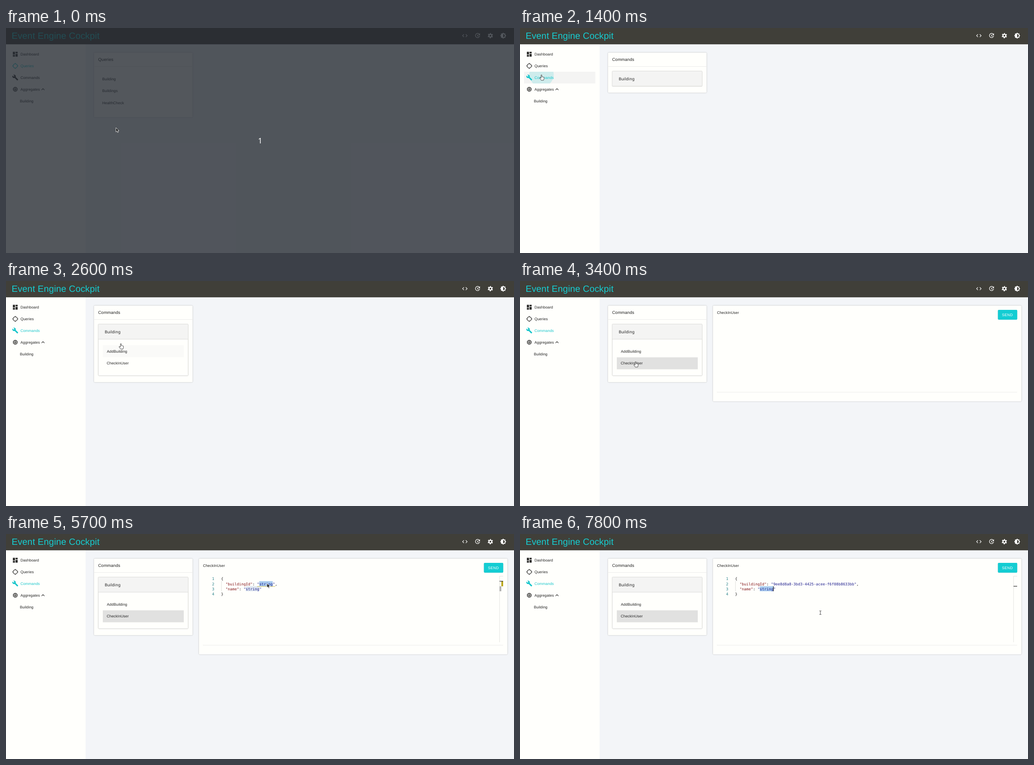
An HTML page for the animation above (8 s loop, 1123 by 499 pixels).

```html
<!DOCTYPE html>
<html lang="en">
<head>
<meta charset="utf-8">
<title>Event Engine Cockpit</title>
<style>
  html, body { margin: 0; width: 100%; height: 100%; overflow: hidden; background: #f3f5f8; }
  svg.stage { display: block; width: 100vw; height: 100vh; }
  text {
    font: 8.25px "Liberation Sans", Arial, sans-serif; letter-spacing: .0107em;
    fill: #222; text-rendering: geometricPrecision; white-space: pre;
  }
  .title { font-size: 20.05px; letter-spacing: .00735em; fill: #16cdd1; }
  .head { font-size: 9.43px; letter-spacing: .0094em; }
  .group { font: 8.85px "Noto Sans", sans-serif; letter-spacing: .0094em; }
  .send { fill: #fff; letter-spacing: .0286em; }
  .code text { font: 8.25px "DejaVu Sans Mono", monospace; letter-spacing: 0; fill: #111; }
  .code .num { fill: #237f86; }
  .code .key { fill: #85161a; }
  .code .str { fill: #20208f; }
  .count { font: 17px "Noto Sans", sans-serif; fill: #fff; text-anchor: middle; }
  .card { fill: #fffffc; filter: drop-shadow(0 .5px .8px rgba(0,0,0,.28)); }
  .rule { stroke: #ececea; }
  .item { color: #2b2b29; }
  .item.on { color: #16c5ca; }
  .item.on text { fill: #16c5ca; }
  .icon { fill: currentColor; }
  .line { fill: none; stroke: currentColor; stroke-width: 2; }
</style>
</head>
<body>
<svg class="stage" viewBox="0 0 1123 499" preserveAspectRatio="none">
  <defs>
    <clipPath id="rowClip"><rect x="9" y="97" width="157.500" height="26"/></clipPath>
    <clipPath id="bodyClip"><rect id="bodyBox" x="204" y="95" width="200" height="34"/></clipPath>
  </defs>

  <rect width="1123" height="499" fill="#f3f5f8"/>
  <rect y="36" width="176" height="463" fill="#fffffc"/>
  <rect width="1123" height="36" fill="#403f39" style="filter:drop-shadow(0 .5px 1px rgba(0,0,0,.35))"/>
  <text class="title" x="12.400" y="24">Event Engine Cockpit</text>

  <g color="#fff">
    <path class="icon" transform="translate(1007.300 10) scale(.59)" d="M9.400 16.600L4.800 12l4.600-4.600L8 6l-6 6 6 6zM14.600 16.600L19.200 12l-4.600-4.600L16 6l6 6-6 6z"/>
    <g transform="translate(1035.400 9.900) scale(.59)">
      <path class="line" d="M18.500 6.800A8 8 0 1 0 20 12.100M11.800 8v4.600l3.800 2.300"/>
      <path class="icon" d="M21 3v7.100h-6.800z"/>
    </g>
    <g transform="translate(1063.700 9.900) scale(.59)">
      <circle class="line" cx="12" cy="12" r="5.300" style="stroke-width:3.800"/>
      <circle class="line" cx="12" cy="12" r="8.200" pathLength="12" stroke-dasharray="1 1" stroke-dashoffset=".5" transform="rotate(-90 12 12)" style="stroke-width:3.400"/>
    </g>
    <path class="icon" fill-rule="evenodd" transform="translate(1092 9.900) scale(.59)" d="M20 15.300L23.300 12 20 8.700V4h-4.700L12 .7 8.700 4H4v4.700L.7 12 4 15.300V20h4.700l3.300 3.300 3.300-3.300H20zM12 18V6a6 6 0 0 1 0 12z"/>
  </g>

  <rect id="menuHover" x="9" y="97" width="157.500" height="26" fill="#f4f4f3"/>
  <circle id="ripple" cx="47.500" cy="103.500" fill="#16c5ca" clip-path="url(#rowClip)"/>

  <g class="item">
    <path class="icon" transform="translate(13.400 51) scale(.59)" d="M3 13h8V3H3zM3 21h8v-6H3zM13 21h8V11h-8zM13 3v6h8V3z"/>
    <text x="31.900" y="61">Dashboard</text>
  </g>
  <g class="item" id="queries">
    <g transform="translate(13.400 77) scale(.59)">
      <circle class="line" cx="12" cy="12" r="8"/>
      <path class="line" d="M12 1v3M12 20v3M1 12h3M20 12h3"/>
    </g>
    <text x="31.900" y="87">Queries</text>
  </g>
  <g class="item" id="commands">
    <path class="icon" transform="translate(13.400 102.800) scale(.59)" d="M22.700 19l-9.100-9.100c.9-2.300.4-5-1.500-6.900-2-2-5-2.400-7.400-1.300L9 6 6 9 1.600 4.700C.4 7.100.9 10.100 2.900 12.100c1.900 1.900 4.600 2.400 6.900 1.500l9.100 9.100c.4.4 1 .4 1.400 0l2.300-2.300c.5-.4.5-1.100.1-1.400z"/>
    <text x="31.900" y="113">Commands</text>
  </g>
  <g class="item">
    <g transform="translate(13.400 128.800) scale(.59)">
      <rect class="line" x="6" y="6" width="12" height="12" rx="1.500"/>
      <rect class="line" x="10" y="10" width="4" height="4"/>
      <path class="line" d="M10 3v3M14 3v3M10 18v3M14 18v3M3 10h3M3 14h3M18 10h3M18 14h3"/>
    </g>
    <text x="31.900" y="139">Aggregates</text>
    <path class="line" transform="translate(74.700 128.900) scale(.59)" d="M6.700 14.700L12 9.400l5.300 5.300"/>
    <text x="30.700" y="164.700">Building</text>
  </g>

  <rect id="listCard" class="card" x="194.500" y="54.500" width="218" height="144" rx="2"/>
  <path class="rule" d="M194.500 85.500h218"/>
  <text id="listTitle" class="head" x="203.700" y="73"></text>

  <g id="queryList">
    <text x="212.700" y="116">Building</text>
    <text x="212.700" y="142.400">Buildings</text>
    <text x="212.700" y="169">HealthCheck</text>
  </g>

  <g id="commandList">
    <rect id="accordion" x="204" y="95.500" width="198.700" height="34" rx="1.500" fill="#fffffc" stroke="#dcdcda" style="filter:drop-shadow(0 .5px .4px rgba(0,0,0,.2))"/>
    <rect x="204.500" y="96" width="197.700" height="33" fill="#f4f4f3"/>
    <text class="group" x="218.200" y="115.700">Building</text>
    <g clip-path="url(#bodyClip)">
      <path d="M204 129h199" stroke="#dcdcda"/>
      <rect id="rowA" x="214" y="142.500" width="179" height="26.500" fill="#fafaf8"/>
      <rect id="rowB" x="214" y="169.300" width="179" height="26.500"/>
      <text x="223" y="158.900">AddBuilding</text>
      <text x="222.700" y="185.300">CheckInUser</text>
    </g>
  </g>

  <g id="panel">
    <rect class="card" x="426.500" y="54.500" width="682" height="212.500" rx="2"/>
    <text x="435.400" y="73">CheckInUser</text>
    <rect x="1056.500" y="64" width="42.700" height="21.800" rx="2" fill="#14cdd3" style="filter:drop-shadow(0 .6px .7px rgba(0,0,0,.3))"/>
    <text class="send" x="1065.600" y="77.800">SEND</text>
    <path class="rule" d="M435 246.500h664"/>
    <g id="editor" class="code">
      <path d="M1091 240V93.500h8" fill="none" stroke="#e2e2e0"/>
      <path d="M476.300 104.500v22.500" stroke="#d6d6d4" stroke-width=".8"/>
      <g id="brackets">
        <path d="M475.800 94h4.800v10.500h-4.800zM475.800 127.600h4.800v10.500h-4.800z" fill="#dfe3dc" stroke="#b5b8b2" stroke-width=".6"/>
        <path d="M1091 93.500h4v11h-4zM1091 127h4v11h-4z" fill="#a2a2a0"/>
      </g>
      <path id="fold" d="M466 97.800l3.300 3.200 3.300-3.200" fill="none" stroke="#b8b8b6" stroke-width=".8"/>
      <rect id="matchB" x="530.100" y="115.800" width="29.800" height="11.200" fill="#dde5ef"/>
      <rect id="selA" x="559.800" y="104.600" width="29.800" height="11.200" fill="#a9cbee"/>
      <rect id="selB" x="530.100" y="115.800" width="29.800" height="11.200" fill="#a9cbee"/>
      <rect id="markMatch" x="1091" y="116" width="4" height="11" fill="#b4b4b2"/>
      <g id="warning">
        <rect x="1095" y="105" width="4" height="11" fill="#bba81d"/>
        <path id="squiggle" fill="none" stroke="#c0ac22" stroke-width=".8"/>
      </g>
      <rect id="mark" x="1091" width="8" height="1.300" fill="#333"/>
      <text class="num" x="455.500" y="102.300">1</text>
      <text class="num" x="455.500" y="113.500">2</text>
      <text class="num" x="455.500" y="124.700">3</text>
      <text class="num" x="455.500" y="135.900">4</text>
      <text x="475.500" y="102.300">{</text>
      <text x="485.400" y="113.500"><tspan class="key">"buildingId"</tspan>: <tspan id="idValue" class="str"></tspan>,</text>
      <text x="485.400" y="124.700"><tspan class="key">"name"</tspan>: <tspan class="str">"string"</tspan></text>
      <text x="475.500" y="135.900">}</text>
      <rect id="caret" x="559.600" y="116" width="1.200" height="11" fill="#111"/>
    </g>
  </g>

  <g id="countdown">
    <rect width="1123" height="499" fill="#262b32" fill-opacity=".79"/>
    <text class="count" x="562" y="256">1</text>
  </g>

  <g id="cursor">
    <path id="arrow" d="M0 0v9.500l2.200-2 1.500 3.400 1.700-.8-1.500-3.200h3z" fill="#1a1a1a" stroke="#fff" stroke-width=".8"/>
    <path id="hand" d="M-1 .8q0-1 .9-1t1 1v3.500q1-.5 1.600.3 1-.5 1.600.3 1.500-.3 1.500 1.300v2.500l-1 3.200h-5.200l-3.300-4.500q-.4-1.300 1-1.300l1.900 1.400z" fill="#fff" stroke="#333" stroke-width=".9" stroke-linejoin="round"/>
    <path id="beam" d="M-2.200-4h1.500L0-3.500l.7-.5h1.500M0-3.500v7M-2.200 4h1.500L0 3.500l.7.500h1.500" fill="none" stroke="#333" stroke-width=".9"/>
  </g>
</svg>

<script>
const LOOP = 8000, TICK = 100;
const UUID = '"9ee8d8a8-3bd3-4425-acee-f6f08b8633bb"';
const ui = {};
document.querySelectorAll('[id]').forEach(el => ui[el.id] = el);

// time, x, y, pointer shape from that time on
const track = [
  [0, 243, 221, 'arrow'], [300, 243, 221, 'arrow'], [1000, 50, 114, 'hand'],
  [1200, 47.5, 104, 'hand'], [1500, 47.5, 104, 'hand'], [1700, 105, 112, 'arrow'],
  [1900, 215, 119, 'hand'], [2000, 240, 119, 'hand'], [2300, 246, 121, 'hand'],
  [2600, 254, 139, 'hand'], [2700, 254, 139, 'hand'], [2800, 255, 177, 'hand'],
  [2900, 255, 177, 'hand'], [3000, 255.500, 179, 'hand'], [3500, 255.500, 179, 'hand'],
  [3800, 365, 166, 'arrow'], [4000, 432, 146, 'beam'], [4100, 439, 143, 'beam'],
  [4500, 575, 107, 'beam'], [4700, 575, 107, 'beam'], [4800, 581, 110, 'beam'],
  [5400, 581, 110, 'beam'], [5500, 576, 107, 'arrow'], [5600, 576, 107, 'arrow'],
  [5700, 577, 109.500, 'arrow'], [5800, 570, 138, 'beam'], [5900, 560, 129, 'beam'],
  [6000, 560, 129, 'beam'], [6300, 543, 123, 'beam'], [6900, 543, 123, 'beam'],
  [7200, 658, 179, 'beam'], [7300, 664, 174.500, 'beam'], [LOOP, 664, 174.500, 'beam']
];

const clamp = v => Math.min(1, Math.max(0, v));
const ease = v => v * v * (3 - 2 * v);
const set = (el, attrs) => { for (const k in attrs) el.setAttribute(k, attrs[k]); };
const show = (id, on) => { ui[id].style.display = on ? '' : 'none'; };

let wave = 'M555 115.900';
for (let i = 0; i < 20; i++) wave += `l2 ${i % 2 ? -1 : 1}`;
set(ui.squiggle, { d: wave });

function moveCursor(t) {
  let i = 0;
  while (i < track.length - 2 && track[i + 1][0] <= t) i++;
  const [t0, x0, y0, shape] = track[i], [t1, x1, y1] = track[i + 1];
  const p = (t - t0) / (t1 - t0);
  set(ui.cursor, { transform: `translate(${x0 + (x1 - x0) * p} ${y0 + (y1 - y0) * p})` });
  for (const id of ['arrow', 'hand', 'beam']) show(id, id === shape);
}

function render(t) {
  const during = (a, b) => t >= a && t < b;
  const onCommands = t >= 1400;

  show('countdown', t < 300);
  ui.queries.classList.toggle('on', !onCommands);
  ui.commands.classList.toggle('on', onCommands);
  show('menuHover', during(1000, 1700));
  show('ripple', during(1300, 1900));
  set(ui.ripple, { r: 4 + 23 * Math.max(0, t - 1300) / 100, opacity: .17 * clamp((1900 - t) / 400) });

  const open = ease(clamp((t - 2050) / 400));
  ui.listTitle.textContent = onCommands ? 'Commands' : 'Queries';
  set(ui.listCard, { height: onCommands ? 89 + 81 * open : 143.5 });
  set(ui.accordion, { height: 34 + 80.5 * open });
  set(ui.bodyBox, { height: 34 + 81 * open });
  show('queryList', !onCommands);
  show('commandList', onCommands);
  show('rowA', during(2600, 2800));
  show('rowB', t >= 2800);
  set(ui.rowB, { fill: t < 3300 ? '#f5f5f3' : '#e1e1e0' });

  const picked = during(5100, 5800), pasted = t >= 5800, second = t >= 6500;
  show('panel', t >= 3400);
  show('editor', t >= 3600);
  show('brackets', t < 5000);
  show('fold', during(3900, 4400));
  show('selA', picked);
  show('matchB', picked);
  show('markMatch', picked);
  show('selB', second);
  show('warning', t < 6200);
  show('squiggle', !pasted);
  show('mark', t >= 5000);
  set(ui.mark, { y: second ? 115.2 : 104 });
  show('caret', during(6500, 7000) || t >= 7800);
  ui.idValue.textContent = pasted ? UUID : '"string"';

  moveCursor(t);
}

const start = performance.now();
let last = -1;
function loop() {
  const t = Math.floor((performance.now() - start) % LOOP / TICK) * TICK;
  if (t !== last) render(last = t);
  requestAnimationFrame(loop);
}
loop();
</script>
</body>
</html>
```
